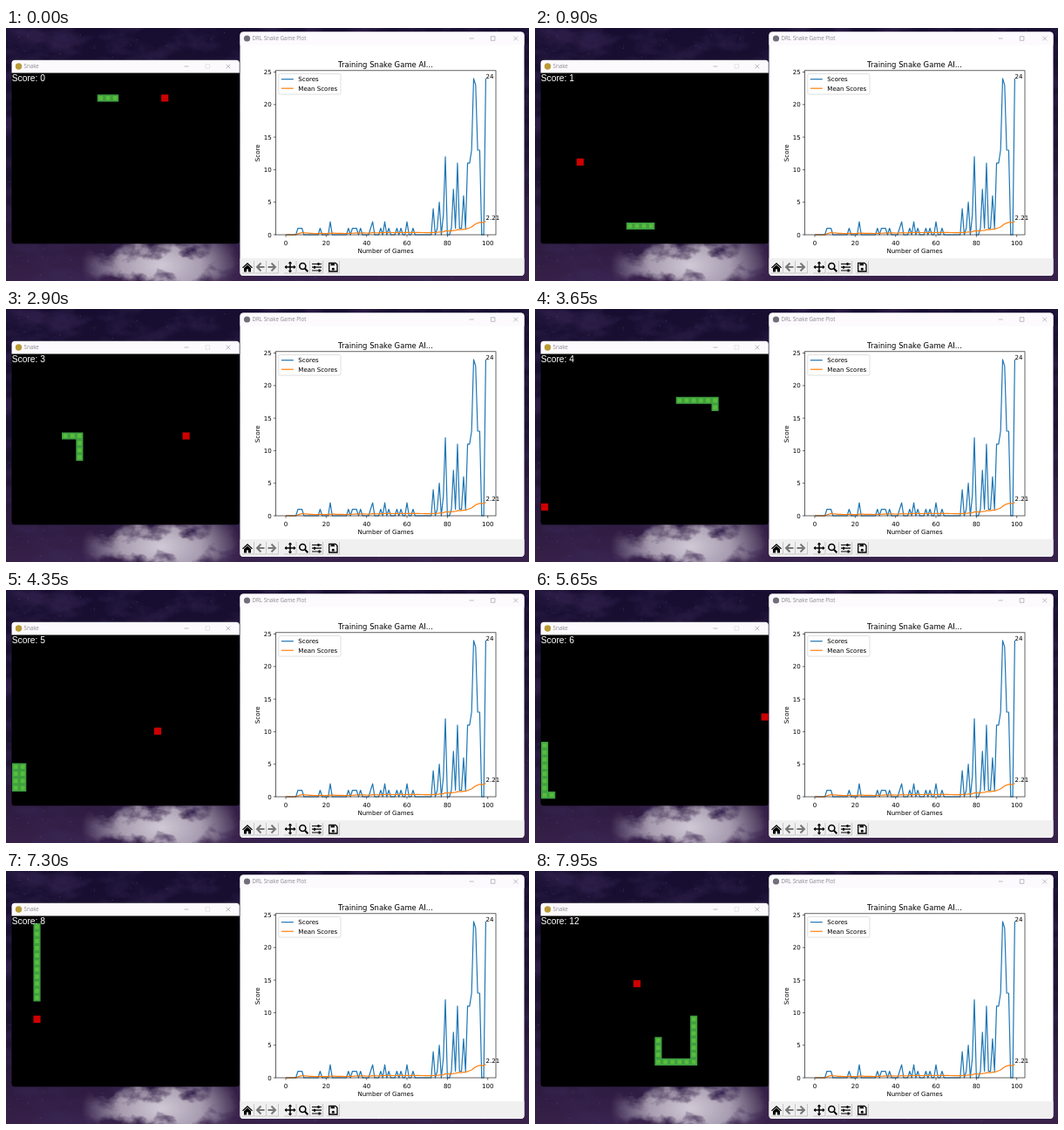
These frames come from a looping animation (600x290 px, 8000 ms). An HTML page:

```html
<!DOCTYPE html>
<html lang="en">
<head>
<meta charset="utf-8">
<title>Snake training</title>
<style>
  html, body { margin: 0; width: 100%; height: 100%; overflow: hidden; background: #160d26; }
  svg { display: block; width: 600px; height: 290px; }
  .ui { font: 6.2px "Open Sans", sans-serif; fill: #8c8a90; }
  .plot { font: 7.06px "DejaVu Sans", sans-serif; }
  .plot .title { font-size: 8.47px; }
  .score { font: 10.3px "Liberation Sans", Arial, sans-serif; fill: #fff; }
  .mid { text-anchor: middle; }
  .end { text-anchor: end; }
  .line { fill: none; stroke-width: 1.2; stroke-linejoin: round; }
  .thin { fill: none; stroke: #a3a1a6; stroke-width: .7; }
  .axis { fill: none; stroke: #222; stroke-width: .7; }
</style>
</head>
<body>
<svg viewBox="0 0 600 290" xmlns="http://www.w3.org/2000/svg">
  <defs>
    <linearGradient id="night" x2=".15" y2="1">
      <stop stop-color="#160d30"/><stop offset=".6" stop-color="#1d1230"/><stop offset="1" stop-color="#38214a"/>
    </linearGradient>
    <radialGradient id="glow">
      <stop stop-color="#fff"/><stop offset=".5" stop-color="#bbb"/><stop offset="1" stop-color="#000"/>
    </radialGradient>
    <mask id="cloud"><ellipse cx="178" cy="272" rx="92" ry="56" fill="url(#glow)"/></mask>
    <filter id="dark" x="0" y="0" width="100%" height="100%">
      <feTurbulence type="fractalNoise" baseFrequency=".025 .04" numOctaves="5" seed="8"/>
      <feColorMatrix values="0 0 0 0 .04  0 0 0 0 .02  0 0 0 0 .09  3 0 0 0 -1.2"/>
    </filter>
    <filter id="bright" x="0" y="0" width="100%" height="100%">
      <feTurbulence type="fractalNoise" baseFrequency=".022 .035" numOctaves="5" seed="3"/>
      <feColorMatrix values="0 0 0 0 .64  0 0 0 0 .59  0 0 0 0 .67  4 0 0 0 -1.4"/>
    </filter>
  </defs>
  <rect width="600" height="290" fill="url(#night)"/>
  <rect width="600" height="290" filter="url(#dark)" opacity=".6"/>
  <g mask="url(#cloud)"><rect width="600" height="290" filter="url(#bright)"/></g>
  <path id="stars" stroke="#a08fb8" stroke-width=".8" opacity=".45"/>

  <!-- game window -->
  <rect x="6.500" y="36.700" width="261.300" height="210.500" rx="3.500"/>
  <path d="M6.500 51.500V40.200q0-3.500 3.500-3.500H264.300q3.500 0 3.500 3.500V51.500z" fill="#fcfafd"/>
  <circle cx="14.500" cy="44" r="3.700" fill="#b99a35"/>
  <text class="ui" x="20.500" y="46.300">Snake</text>
  <path class="thin" d="M204.500 44h5M252.600 41.600l4.800 4.800m0-4.800l-4.800 4.800"/>
  <path class="thin" opacity=".35" d="M229 41.700h4.600v4.600h-4.600z"/>
  <path id="food" fill="#cd0000"/>
  <path id="body" fill="#3fa040"/>
  <path id="core" fill="#58bd3d"/>
  <text class="score" id="score" x="6.700" y="61.400"></text>

  <!-- plot window -->
  <rect x="268.500" y="4.500" width="326" height="279.500" rx="4" fill="#fff"/>
  <path d="M268.500 19.500V8.500q0-4 4-4H590.500q4 0 4 4V19.500z" fill="#fcfafd"/>
  <path d="M268.500 264H594.500V280q0 4-4 4H272.500q-4 0-4-4z" fill="#f0f0f0"/>
  <circle cx="276.500" cy="12" r="3.600" fill="#70707a"/>
  <text class="ui" x="282.500" y="14.300">DRL Snake Game Plot</text>
  <path class="thin" d="M531.700 12h5M556.300 9.700h4.600v4.600h-4.600zM582.300 9.600l4.800 4.800m0-4.800l-4.800 4.800"/>
  <g class="plot">
    <text class="title mid" x="435.500" y="45">Training Snake Game AI...</text>
    <text class="mid" x="435.500" y="258">Number of Games</text>
    <text class="mid" transform="translate(291 143.300) rotate(-90)">Score</text>
    <g id="ticks"></g>
    <path class="line" id="scores" stroke="#1f77b4"/>
    <path class="line" id="means" stroke="#ff7f0e"/>
    <rect class="axis" x="309.500" y="48.800" width="252.500" height="188.200"/>
    <text x="550.500" y="58">24</text>
    <text x="550.500" y="220.300">2.21</text>
    <rect x="312.800" y="52.500" width="71.200" height="23.500" rx="1.500" fill="#fff" fill-opacity=".8" stroke="#ccc" stroke-width=".6"/>
    <path class="line" d="M315.800 58.700h14" stroke="#1f77b4"/>
    <path class="line" d="M315.800 69.200h14" stroke="#ff7f0e"/>
    <text x="335.300" y="61.200">Scores</text>
    <text x="335.300" y="71.700">Mean Scores</text>
  </g>

  <!-- toolbar -->
  <path d="M284.500 267v14h-14M298.500 267v14h-13M312.500 267v14h-13M333 267v14h-14M348.500 267v14h-14M363.500 267v14h-14M382.500 267v14h-14" fill="none" stroke="#b5b5b5" stroke-width=".7"/>
  <path d="M271 274.500l6-5.500 6 5.500-1 .8-5-4.500-5 4.500zM273 275.200l4-3.600 4 3.600V279.500h-3v-3h-2v3h-3z"/>
  <g fill="none" stroke="#777" stroke-width="2">
    <path d="M296.500 274h-8m4-4.500l-4.500 4.500 4.500 4.500"/>
    <path d="M300.500 274h8m-4-4.500l4.500 4.500-4.500 4.500"/>
  </g>
  <g fill="none" stroke="#000">
    <path d="M320.500 274h11M326 268.500v11" stroke-width="1.500"/>
    <path d="M324.500 270l1.500-1.500 1.500 1.500M324.500 278l1.500 1.500 1.500-1.500M322 272.500l-1.500 1.500 1.500 1.500M330 272.500l1.500 1.500-1.500 1.500" stroke-width="1.300"/>
    <circle cx="340.300" cy="273" r="3.500" stroke-width="1.600"/>
    <path d="M343 275.800l3.300 3.400" stroke-width="2"/>
    <path d="M351 270.500h11M351 274.200h11M351 278h11" stroke-width="1.200"/>
    <path d="M358.500 269v3M354 272.700v3M359.500 276.500v3" stroke-width="2"/>
    <path d="M370.700 269.300h7.300l2 2v7.700h-9.300z" stroke-width="1.300"/>
    <path d="M372.500 271.200h4.500" stroke-width="2"/>
  </g>
  <circle cx="375.300" cy="276.200" r="1.500"/>
</svg>
<script>
const $ = id => document.getElementById(id);
const CELL = 8.147, LEFT = 7, TOP = 51.8;
const FRAME = 50, FRAMES = 160, STEPS_PER_FRAME = 2.692;

function randomFrom(seed) {
  return () => (seed = seed * 16807 % 2147483647) / 2147483647;
}

function drawStars() {
  const random = randomFrom(41);
  let stars = '';
  for (let i = 0; i < 260; i++) {
    stars += `M${(random() * 600).toFixed(1)} ${(random() * 290).toFixed(1)}h.8`;
  }
  $('stars').setAttribute('d', stars);
}

// ---- training chart ----
// Mostly 0 or 1 by chance, with spikes once the agent starts to learn.
function trainingScores() {
  const random = randomFrom(7);
  const spikes = { 22: 2, 43: 2, 49: 2, 60: 2, 73: 4, 76: 5, 78: 3, 79: 12, 83: 7, 85: 11, 88: 6 };
  const finish = [11, 11, 13, 24, 23, 13, 13, 0, 0, 24];
  const early = Array.from({ length: 90 }, (_, game) => {
    const chance = random() < .35 ? 1 : 0;
    return spikes[game] ?? (game < 17 ? +(Math.abs(game - 7) < 2) : chance);
  });
  return early.concat(finish);
}

function drawChart() {
  const px = game => 321 + game * 2.317;
  const py = value => 237 - value * 7.46;
  const scores = trainingScores();
  let sum = 0;
  const means = scores.map((s, i) => (sum += s) / (i + 1));
  const trace = list => 'M' + list.map((v, i) => `${px(i).toFixed(2)} ${py(v).toFixed(2)}`).join('L');
  $('scores').setAttribute('d', trace(scores));
  $('means').setAttribute('d', trace(means));

  let ticks = '';
  for (let v = 0; v <= 100; v += 20) {
    ticks += `<path class="axis" d="M${px(v)} 237v2.500"/><text class="mid" x="${px(v)}" y="249">${v}</text>`;
  }
  for (let v = 0; v <= 25; v += 5) {
    ticks += `<path class="axis" d="M309.500 ${py(v)}h-2.500"/><text class="end" x="304.700" y="${py(v) + 2.6}">${v}</text>`;
  }
  $('ticks').innerHTML = ticks;
}

// ---- snake ----
// The head goes to each stop along the row first, then the column.
const eat = (x, y) => ({ x, y, food: true });
const pass = (x, y) => ({ x, y });
const stops = [
  eat(21, 3), pass(28, 21), eat(5, 12), pass(24, 17), eat(16, 18),
  pass(23, 23), pass(0, 11), pass(9, 20), eat(24, 11),
  pass(24, 6), eat(0, 21), pass(1, 13), eat(20, 13),
  pass(25, 22), pass(0, 15), pass(18, 18), eat(31, 11), eat(31, 1),
  eat(3, 14), eat(21, 14), eat(21, 20), eat(16, 17), eat(13, 9)
];

const route = [{ x: 12, y: 3 }];
const foods = [];
for (const stop of stops) {
  let { x, y } = route[route.length - 1];
  while (x !== stop.x || y !== stop.y) {
    if (x !== stop.x) x += Math.sign(stop.x - x);
    else y += Math.sign(stop.y - y);
    route.push({ x, y });
  }
  if (stop.food) foods.push({ x, y, at: route.length - 1 });
}

const squares = (cells, inset) => cells.map(({ x, y }) => {
  const size = CELL - 2 * inset;
  return `M${(LEFT + x * CELL + inset).toFixed(2)} ${(TOP + y * CELL + inset).toFixed(2)}h${size}v${size}h${-size}z`;
}).join('');

function draw(frame) {
  const head = Math.floor(frame * STEPS_PER_FRAME) + 2;
  const score = foods.filter(food => food.at <= head).length;
  const snake = route.slice(head - score - 2, head + 1);
  $('body').setAttribute('d', squares(snake, 0));
  $('core').setAttribute('d', squares(snake, 1.7));
  $('food').setAttribute('d', squares([foods[score]], 0));
  $('score').textContent = 'Score: ' + score;
}

const start = performance.now();
let shown = -1;
function tick() {
  const frame = Math.floor((performance.now() - start) / FRAME) % FRAMES;
  if (frame !== shown) draw(shown = frame);
  requestAnimationFrame(tick);
}

drawStars();
drawChart();
tick();
</script>
</body>
</html>
```
